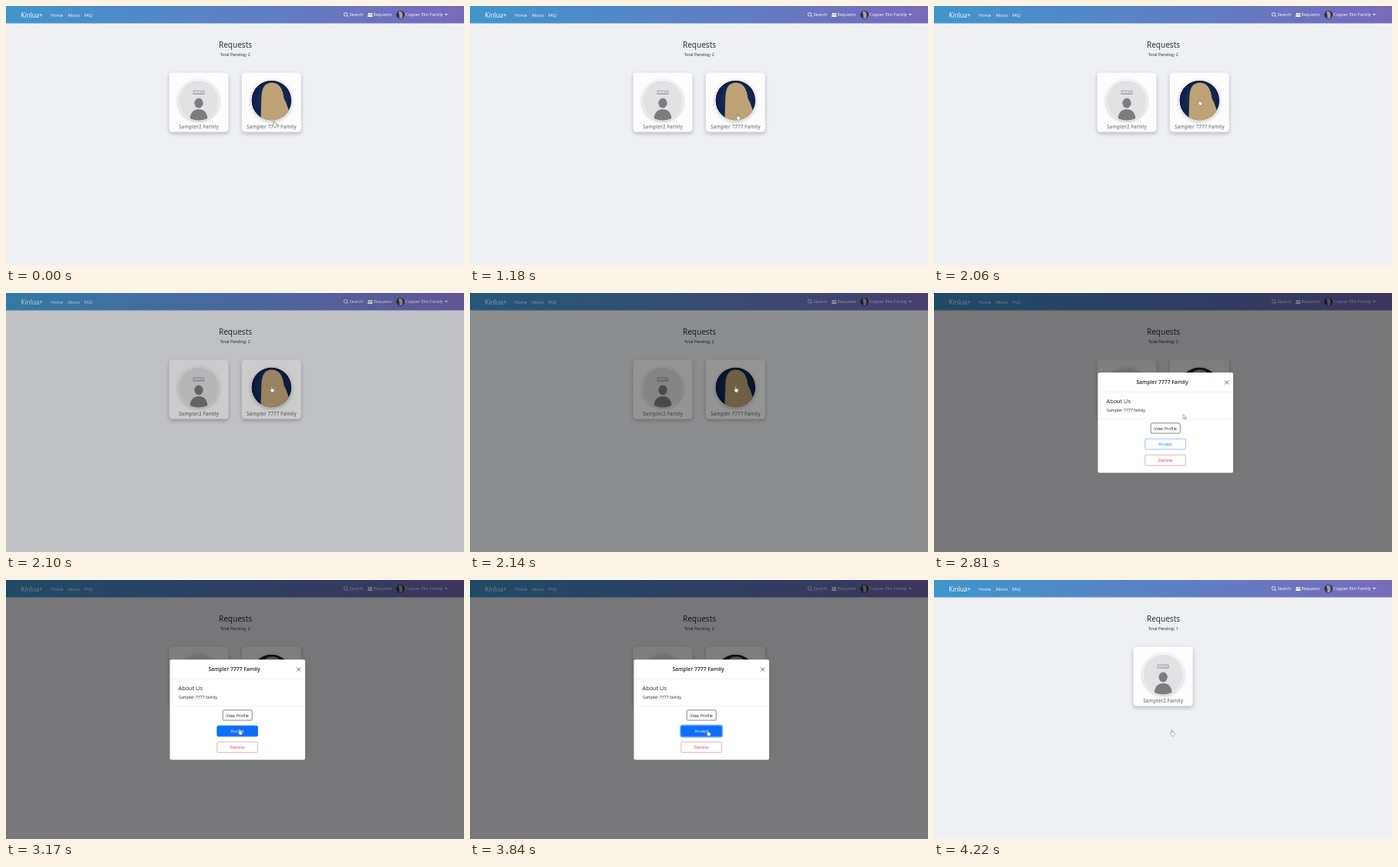
An HTML page that plays this animation: 594x336 px, repeating every 4.73 s.

```html
<!DOCTYPE html>
<html lang="en">
<head>
<meta charset="utf-8">
<title>Requests</title>
<style>
  html, body { margin: 0; width: 100%; height: 100%; overflow: hidden; background: #eff0f4; }
  svg { display: block; width: 594px; height: 336px; }
  text { font-family: "Open Sans", "Noto Sans", sans-serif; fill: #212529; }
  .nav text { fill: #fff; font-size: 5.6px; }
  .nav .brand { font-size: 8.2px; }
  .mid { text-anchor: middle; }
  .heading { font-size: 10.1px; }
  .small { font-size: 5.25px; }
  .label { font-size: 6.5px; font-weight: 600; fill: #818185; }
  .title { font-size: 6.75px; font-weight: 600; }
  .button text { font-size: 5.4px; text-anchor: middle; }
  .button rect { stroke-width: .7; }
  .card { fill: #fefdfe; filter: drop-shadow(0 2px 2.5px rgba(0, 0, 0, .25)); }
  .photo { filter: drop-shadow(0 1px 2px rgba(0, 0, 0, .25)); }
  .rule { stroke: #dee2e6; stroke-width: .5; }
</style>
</head>
<body>
<svg viewBox="0 0 594 336">
  <defs>
    <linearGradient id="bar">
      <stop offset="0" stop-color="#3f96cd"/>
      <stop offset="1" stop-color="#786abb"/>
    </linearGradient>
    <radialGradient id="night">
      <stop offset="0" stop-color="#1d4273"/>
      <stop offset="1" stop-color="#0d1e42"/>
    </radialGradient>
    <clipPath id="round"><circle r="26"/></clipPath>

    <g id="personCard">
      <rect class="card" x="-38.5" y="-36" width="77" height="77" rx="4.5"/>
      <circle class="photo" r="26.6" fill="#fff"/>
      <g clip-path="url(#round)">
        <circle r="26" fill="#e2e1e4"/>
        <rect x="-7.5" y="-13" width="15" height="5.5" rx=".6" fill="#b2b1b4"/>
        <text class="mid" y="-9.2" style="font-size:3px;fill:#fff;font-weight:700">photo it</text>
        <ellipse cy="3.5" rx="5.6" ry="6.5" fill="#7d7c7e"/>
        <path d="M-11.7 27Q-11.5 11.5 0 11.5T11.7 27Z" fill="#7d7c7e"/>
      </g>
      <text class="label mid" y="36.6">Sampler2 Family</text>
    </g>

    <g id="nightCard">
      <rect class="card" x="-38.5" y="-36" width="77" height="77" rx="4.5"/>
      <circle class="photo" r="26.6" fill="#fff"/>
      <g clip-path="url(#round)">
        <circle r="26" fill="url(#night)"/>
        <path d="M-14 28L-13-5Q-12-23 0-23Q14-23 16-3Q24 11 24 28Z" fill="#bda276"/>
      </g>
      <text class="label mid" y="36.6">Sampler 7777 Family</text>
    </g>
  </defs>

  <rect width="594" height="336" fill="#eff0f4"/>

  <g class="nav">
    <rect width="594" height="22.5" fill="url(#bar)"/>
    <text class="brand" x="19.3" y="15">Kinlua+</text>
    <text x="58" y="14">Home</text>
    <text x="80" y="14">About</text>
    <text x="101.5" y="14">FAQ</text>
    <g fill="none" stroke="#fff" stroke-width=".8">
      <circle cx="440.5" cy="10.8" r="2.3"/>
      <path d="M442.2 12.5L444.2 14.4"/>
    </g>
    <text x="445.5" y="13.2">Search</text>
    <g fill="#fff">
      <circle cx="470.8" cy="10.2" r="1.3"/>
      <circle cx="473.7" cy="10.2" r="1.3"/>
      <path d="M468.8 14q0-2.2 2-2.2t1.5.6q.4-.6 1.5-.6 1.9 0 1.9 2.2z"/>
      <path d="M569 10.3h4l-2 2z"/>
    </g>
    <text x="476.5" y="13.2">Requests</text>
    <circle cx="511.5" cy="11.3" r="5.4" fill="#39314f"/>
    <path d="M509 7.5q4-2 5 2t-1 6.5h-3q1-3-1-8.500z" fill="#a79fae"/>
    <text x="518" y="13.2">Copper Elm Family</text>
  </g>

  <text class="heading mid" x="297.500" y="54.3">Requests</text>

  <g id="before">
    <text class="small mid" x="297.3" y="64.7">Total Pending: 2</text>
    <use href="#personCard" x="250" y="122.5"/>
    <use href="#nightCard" x="344.3" y="122.5"/>
  </g>
  <g id="after">
    <text class="small mid" x="297.3" y="64.7">Total Pending: 1</text>
    <use href="#personCard" x="297.2" y="122.5"/>
  </g>

  <rect id="backdrop" width="594" height="336"/>

  <g id="modal">
    <rect x="212.500" y="103.200" width="175.500" height="130" rx="2" fill="#fff"/>
    <text class="title mid" x="296" y="118.400">Sampler 7777 Family</text>
    <path d="M377 113.500l5 5m0-5l-5 5" stroke="#555" stroke-width=".9"/>
    <path class="rule" d="M212.500 128.300h175.500M212.500 163.200h175.500"/>
    <text x="223.500" y="143" style="font-size:7.35px">About Us</text>
    <text class="small" x="224" y="153.800">Sampler 7777 family</text>

    <g class="button">
      <rect x="281.200" y="168.800" width="38" height="13.200" rx="1.800" fill="#fff" stroke="#4c5054"/>
      <rect id="viewFill" x="281.200" y="168.800" width="38" height="13.200" rx="1.800" fill="#212529"/>
      <text id="viewText" x="300.200" y="177.600">View Profile</text>
    </g>
    <g class="button">
      <rect id="ring" x="272.800" y="188.200" width="54.600" height="15.600" rx="2.600" fill="none" stroke="#86b7fe" style="stroke-width:1.400"/>
      <rect x="273.800" y="189.200" width="52.600" height="13.600" rx="1.800" fill="#fff" stroke="#6aa5fd"/>
      <rect id="acceptFill" x="273.800" y="189.200" width="52.600" height="13.600" rx="1.800" fill="#0d6efd" stroke="#0d6efd"/>
      <text id="acceptText" x="300" y="198">Accept</text>
    </g>
    <g class="button">
      <rect x="273.800" y="210" width="52.600" height="13.800" rx="1.800" fill="#fff" stroke="#e08a94"/>
      <text x="300" y="218.900" style="fill:#dc3545">Decline</text>
    </g>
  </g>

  <g id="cursor" stroke="#444" stroke-width=".45" stroke-linejoin="round" fill="#fff">
    <path id="arrow" d="M0 0v6l1.400-1.200 .9 2 .9-.4-.9-1.900h1.800z"/>
    <path id="hand" d="M-.6 4.600V.7a.7.7 0 0 1 1.400 0V3l2 .5q.9.2.8 1.100l-.4 2.300-.5 1.100H.2L-1.800 5.300q-.3-.9.5-.8z"/>
  </g>
</svg>

<script>
const LOOP = 4730;
const CUT = 3930;
const byId = id => document.getElementById(id);

// steps: [time in ms, value, easing towards the next step]
function play(id, property, steps, easing = 'linear') {
  const last = steps[steps.length - 1];
  const frames = [...steps, [LOOP, last[1]]].map(([time, value, ease]) => ({
    offset: time / LOOP, [property]: value, easing: ease || easing
  }));
  byId(id).animate(frames, { duration: LOOP, iterations: Infinity });
}
const fade = (id, steps) => play(id, 'opacity', steps);
const toggle = (id, steps) => play(id, 'opacity', steps, 'step-end');
const at = (x, y) => `translate(${x}px, ${y}px)`;

// Page and dialog
toggle('before', [[0, 1], [CUT, 0]]);
toggle('after', [[0, 0], [CUT, 1]]);
fade('backdrop', [[0, 0], [2066, 0], [2156, .5], [CUT, .5], [CUT, 0]]);
fade('modal', [[0, 0], [2160, 0], [2257, 1], [CUT, 1], [CUT, 0]]);
play('modal', 'transform', [[0, at(0, -18)], [2160, at(0, -18), 'ease-out'], [2350, at(0, 0)]]);

// Button states
fade('viewFill', [[0, 0], [2858, 0], [2930, .75], [3010, 0]]);
play('viewText', 'fill', [[0, '#212529'], [2858, '#212529'], [2930, '#c8c9ca'], [3010, '#212529']]);
fade('acceptFill', [[0, 0], [2973, 0], [3050, 1]]);
play('acceptText', 'fill', [[0, '#0d6efd'], [2973, '#0d6efd'], [3050, '#fff']]);
fade('ring', [[0, 0], [3750, 0], [3840, 1]]);

// Pointer
play('cursor', 'transform', [
  [0, at(347.5, 149)], [40, at(347.5, 149), 'ease-out'],
  [190, at(347, 140)], [1330, at(347, 140), 'ease-in-out'],
  [1550, at(344.3, 121)], [2590, at(344.3, 121), 'ease-in'],
  [2810, at(323.5, 157), 'ease-out'],
  [3050, at(303, 193)], [3410, at(303, 193), 'ease-in-out'],
  [3780, at(308.5, 194.5)]
]);
const hand = [[0, 1], [2180, 0], [2858, 1], [2930, 0], [2973, 1]];
toggle('hand', hand);
toggle('arrow', hand.map(([time, shown]) => [time, 1 - shown]));
</script>
</body>
</html>
```
